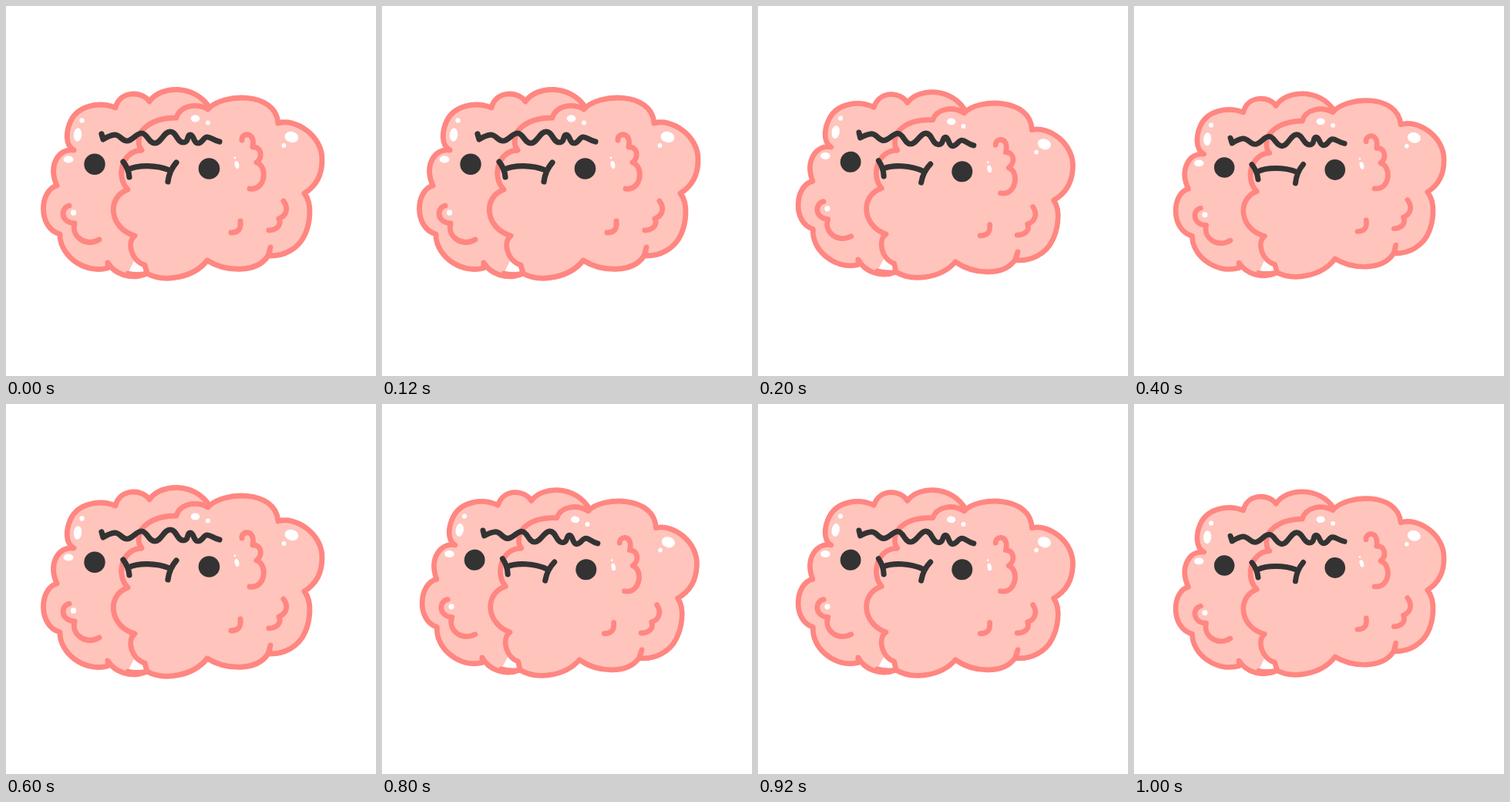
An HTML page for the animation above (1.2 s loop, 480 px wide and 480 px high).

```html
<!DOCTYPE html>
<html lang="en">
<head>
<meta charset="utf-8">
<title>Wobbling brain</title>
<style>
  html, body { margin: 0; width: 100%; height: 100%; overflow: hidden; background: #fff; }
  svg { display: block; width: 100%; height: 100%; }
  path { stroke-linecap: round; stroke-linejoin: round; stroke-width: 6.9; }
  .lobe { fill: #ffc4bc; stroke: #ff8681; }
  .fold { fill: none; stroke: #ff8681; }
  .ink { fill: none; stroke: #333; stroke-width: 7.2; }
</style>
</head>
<body>
<svg viewBox="0 0 480 480">
  <g id="brain">
    <path class="lobe" d="M264 132 C245 101 200 103 186 124 C177 110 148 109 142 132
      C120 123 93 130 84 149 C78 162 76 180 88 187 C69 184 54 206 66 233
      C43 239 41 288 70 296 C69 322 100 348 132 340 L132 333 C141 348 162 356 183 347
      Q170 350 158 347"/>
    <path class="lobe" d="M176 187 C170 180 171 166 180 158 C191 148 206 145 221 145
      C225 130 246 125 262 134 C280 113 350 110 353 152 C375 145 411 168 410 200
      C410 222 400 235 387 243 C399 258 393 285 388 296 C380 315 360 325 341 324
      L343 313 L340 324 C325 347 285 345 261 330 C243 353 205 359 183 347
      L180 336 C163 331 156 307 167 298 C135 289 129 249 158 238
      C142 222 150 188 176 187"/>
    <path class="fold" d="M82 259 C70 262 71 281 89 282 C84 300 105 313 121 303
      M306 174 C305 164 324 162 320 183 C331 182 334 196 325 203 C340 208 337 240 316 237
      M304 279 Q306 294 292 294 M360 253 C368 264 362 273 354 276 C358 285 350 291 341 291"/>
    <g fill="#fff">
      <ellipse cx="93" cy="167" rx="5.2" ry="8.7" transform="rotate(5 93 167)"/>
      <circle cx="98.5" cy="148.5" r="3.2"/>
      <ellipse cx="81" cy="199" rx="6.5" ry="4.5"/>
      <circle cx="87.5" cy="268" r="3.7"/>
      <ellipse cx="245.5" cy="146" rx="5.8" ry="4.5"/>
      <circle cx="262" cy="151.5" r="3"/>
      <ellipse cx="370.5" cy="170" rx="9" ry="7" transform="rotate(15 370.5 170)"/>
      <circle cx="360.5" cy="181" r="2.9"/>
      <ellipse cx="299.5" cy="206" rx="2.8" ry="5" transform="rotate(-15 299.5 206)"/>
      <circle cx="297" cy="197" r="1.4"/>
    </g>
    <path class="ink" d="M124 166 L126 173 Q134 168 141 167 C148 167 150 175 157 175
      S169 165 176 165 S185 178 193 178 S205 163 213 163 S222 177 230 177
      S234 167 239 167 S243 178 249 178 S256 170 261 170 S268 174 277 176"/>
    <path class="ink" d="M152 202 Q159 211 160 222 M159 212 C171 206 195 206 212 213
      M221 203 C213 212 211 220 210 228"/>
    <g fill="#333">
      <circle cx="115" cy="205.3" r="13.7"/>
      <circle cx="263.5" cy="211" r="13.8"/>
    </g>
  </g>
</svg>
<script>
  // Each pose is a slight tilt and squash, held for one step.
  const poses = [
    [1, 0, 0, 1, 0, 0],
    [0.976, 0.046, -0.053, 0.985, 18.8, -5.2],
    [0.966, -0.017, 0.02, 0.97, 2, 12.3]
  ];
  const step = 200;
  const brain = document.getElementById("brain");
  const start = performance.now();

  function draw(now) {
    const i = Math.floor(Math.max(0, now - start) / step) % poses.length;
    brain.setAttribute("transform", `matrix(${poses[i]})`);
    requestAnimationFrame(draw);
  }
  draw(start);
</script>
</body>
</html>
```
